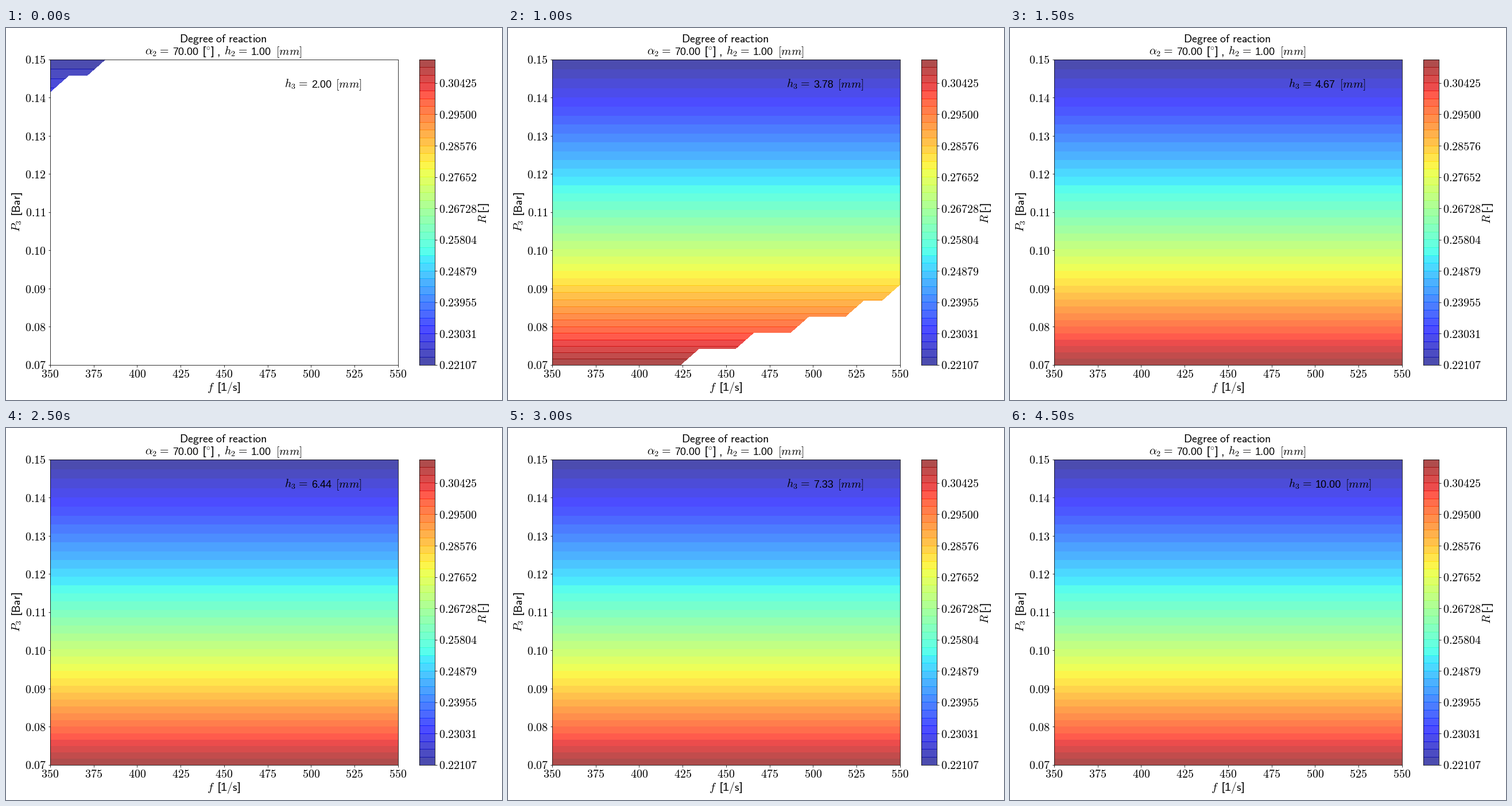
Write a matplotlib script that moves like this. It is 864x648 px and loops after 5000 ms.

```python
import numpy as np
import matplotlib.pyplot as plt
from matplotlib.animation import FuncAnimation

W, H, DPI = 864, 648, 72
plt.rcParams.update({"mathtext.fontset": "cm", "font.size": 20,
                     "font.family": "Liberation Sans",
                     "axes.linewidth": 0.8})

N = 20
EXPONENT = 0.4
R_MIN, R_MAX = 0.221068, 0.3111775
FRAMES, INTERVAL = 10, 500
DIGIT = 10  # advance of one digit in the labels, in pixels

freq = np.linspace(350, 550, N)
pressure = np.linspace(0.07, 0.15, N)
heights = np.linspace(2, 10, FRAMES)

# Lowest feasible pressure row for each frequency column.
FLOORS = [
    [17, 18, 18, 19] + [N] * 16,
    [4, 5, 5, 6, 6, 6, 7, 7, 8, 8, 9, 9, 10, 11, 11, 12, 13, 14, 15, 17],
    [0] * 8 + [1] * 3 + [2] * 3 + [3] * 3 + [4] * 2 + [5],
    [0] * N,
]

power = pressure ** EXPONENT
share = (power[-1] - power) / (power[-1] - power[0])
reaction = np.tile((R_MIN + (R_MAX - R_MIN) * share)[:, None], (1, N))
levels = np.linspace(reaction.min(), reaction.max(), 40)

fig = plt.figure(figsize=(W / DPI, H / DPI), dpi=DPI, facecolor="white")


def box(left, top, right, bottom):
    return fig.add_axes([left / W, 1 - bottom / H,
                         (right - left) / W, (bottom - top) / H])


def put(x, y, text, **kw):
    return fig.text(x / W, 1 - y / H, text, ha="left", va="baseline",
                    rotation_mode="anchor", **kw)


def put_value(x, y, name, value):
    """Write 'name = value [mm]' and return the value and unit texts."""
    put(x, y, rf"${name}\hspace{{0.07}}=$")
    number = put(x + 47, y, f"{value:.2f}", fontsize=18)
    unit = put(x + 89.5, y, "$[mm]$")
    return number, unit


def fill(floor):
    hidden = np.arange(N)[:, None] < np.array(floor)
    return ax.contourf(freq, pressure, np.ma.array(reaction, mask=hidden),
                       levels=levels, cmap="jet", alpha=0.7)


ax = box(77, 55, 682.6, 587)
fills = [fill(floor) for floor in FLOORS]
ax.set_xlim(350, 550)
ax.set_ylim(0.07, 0.15)
xticks = np.arange(350, 551, 25)
yticks = np.linspace(0.07, 0.15, 9)
ax.set_xticks(xticks, [f"${v}$" for v in xticks])
ax.set_yticks(yticks, [f"${v:.2f}$" for v in yticks])

# Unsnapped bands overlap by a pixel, which gives the dark seams.
cax = box(720.2, 55, 746.9, 587)
bands = cax.contourf([0, 1], levels, np.tile(levels[:, None], (1, 2)),
                     levels=levels, cmap="jet", alpha=0.7)
bands.set_snap(False)
cax.set_xticks([])
cax.yaxis.tick_right()
cax.set_yticks(levels[::4], [f"${v:.5f}$" for v in levels[::4]])

put(302, 25, r"$\mathsf{Degree\ of\ reaction}$")
put(241.5, 47, r"$\alpha_2\hspace{0.07}=$")
put(290, 47, "70.00", fontsize=18)
put(342.5, 47, r"$\mathdefault{[}^{\circ}\mathdefault{]}$")
put(367, 47, ",")
put_value(380, 47, "h_2", 1)

put(350, 632, r"$f$")
put(368.5, 632, r"$\mathdefault{[1}/\mathsf{s}\mathdefault{]}$")
put(25, 355, r"$P_3$", rotation=90)
put(25, 327, r"$\mathdefault{[}\mathsf{Bar}\mathdefault{]}$", rotation=90)
put(837, 341, r"$R$", rotation=90)
put(837, 320, "[-]", rotation=90)

number, unit = put_value(485, 104, "h_3", heights[0])
unit_x = unit.get_position()[0]


def update(i):
    for k, shape in enumerate(fills):
        shape.set_visible(k == min(i, len(fills) - 1))
    value = f"{heights[i]:.2f}"
    number.set_text(value)
    unit.set_x(unit_x + (len(value) - 4) * DIGIT / W)
    return [*fills, number, unit]


anim = FuncAnimation(fig, update, frames=FRAMES, interval=INTERVAL,
                     repeat=True, repeat_delay=0, blit=False)
plt.show()
```
